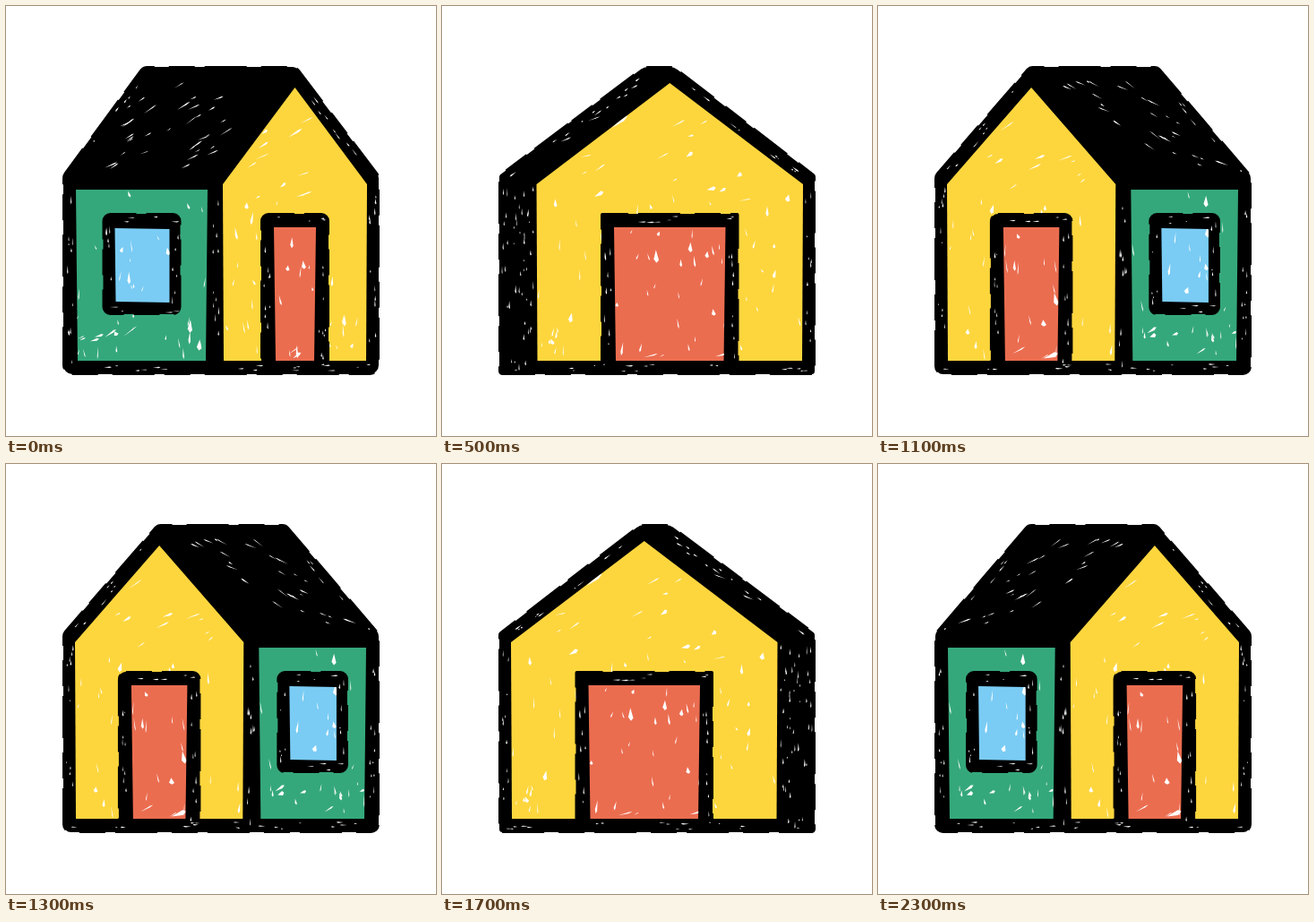
Write an HTML page with a canvas that moves like this. It is 480 by 480 pixels and loops after 2.4 s.

```html
<!DOCTYPE html>
<html lang="en">
<head>
<meta charset="utf-8">
<title>Turning house</title>
<style>
html, body { margin: 0; width: 100%; height: 100%; overflow: hidden; background: #fff; }
canvas { display: block; width: 100vmin; height: 100vmin; }
</style>
</head>
<body>
<canvas width="480" height="480"></canvas>
<script>
const ctx = document.querySelector('canvas').getContext('2d');
const YELLOW = '#fdd63e', GREEN = '#35a87b', RED = '#eb6d50', BLUE = '#7accf4';
const LEFT = 64, RIGHT = 416, TOP = 68, EAVE = 189, FOOT = 411, FLOOR = 396;

// Pose p runs from the widest side view (0) to the plain front (6).
function pose(p) {
  const front = [242 - 27.3 * p, 403];
  const mid = (front[0] + front[1]) / 2, half = 23.5 + 7.75 * p;
  const side = [78, front[0] - 17];
  const paneMid = (side[0] + side[1]) / 2, paneHalf = Math.max(7, 44 * Math.cos(0.44 * p));
  return {
    p, front, mid, side,
    ridge: [153 + 14.5 * p, 324 - 13 * p],
    door: [mid - half, mid + half],
    pane: [paneMid - paneHalf, paneMid + paneHalf],
    corner: 10 - 1.3 * p,
    frontal: p > 4
  };
}

let seed = 1;
function random() {
  seed = (seed * 16807) % 2147483647;
  return seed / 2147483647;
}
const range = (a, b) => a + (b - a) * random();
const mix = (a, b, t) => a + (b - a) * t;

function polygon(points, radius = 0) {
  const [ax, ay] = points[points.length - 1], [bx, by] = points[0];
  ctx.beginPath();
  ctx.moveTo((ax + bx) / 2, (ay + by) / 2);
  points.forEach(([x, y, r = radius], i) => {
    const [nx, ny] = points[(i + 1) % points.length];
    ctx.arcTo(x, y, nx, ny, r);
  });
  ctx.closePath();
}

// Fills the current path in black with a slightly uneven edge.
function ink() {
  ctx.fillStyle = ctx.strokeStyle = '#000';
  ctx.fill();
  ctx.lineWidth = 2;
  ctx.setLineDash([29, 11, 47, 16]);
  ctx.stroke();
}

function box(x, y, w, h, r) {
  ctx.beginPath();
  ctx.roundRect(x, y, w, h, r);
  ink();
}

// A thin white wedge the crayon has missed.
function speck(x, y, dx, dy, w) {
  const n = w / Math.hypot(dx, dy) / 2;
  ctx.fillStyle = '#fff';
  ctx.beginPath();
  ctx.moveTo(x, y);
  ctx.lineTo(x + dx * 0.7 - dy * n, y + dy * 0.7 + dx * n);
  ctx.lineTo(x + dx, y + dy);
  ctx.lineTo(x + dx * 0.8 + dy * n, y + dy * 0.8 - dx * n);
  ctx.fill();
}

// Small white scratches running along a black stroke.
function scratch(x1, y1, x2, y2, spread) {
  const len = Math.hypot(x2 - x1, y2 - y1), ux = (x2 - x1) / len, uy = (y2 - y1) / len;
  for (let i = 0; i < len * spread / 75; i++) {
    const t = random() * len, s = range(-spread, spread), l = range(2, 10);
    speck(x1 + ux * t - uy * s, y1 + uy * t + ux * s, ux * l, uy * l, range(0.7, 1.6));
  }
}

// Colours a shape and leaves bare flecks inside it.
function area(points, color, flecks) {
  ctx.save();
  polygon(points);
  ctx.fillStyle = color;
  ctx.fill();
  ctx.clip();
  flecks();
  ctx.restore();
}

// Mostly hairlines, now and then a broad patch.
const thickness = () => 1 + 5 * random() ** 4;

function upright(x, y, w, h, count) {
  for (let i = 0; i < count; i++) {
    speck(x + random() * w, y + random() * h, range(-3, 3), range(4, 15), thickness());
  }
}

function slanted(x, y, w, h, count) {
  for (let i = 0; i < count; i++) {
    const l = range(5, 18);
    speck(x + random() * w, y + random() * h, l, -l * range(0.2, 0.8), thickness());
  }
}

function shell({ ridge: [tl, tr], front: [fl], mid, corner, frontal }) {
  const top = frontal ? 14 : corner;
  polygon([
    [tl, TOP, top], [tr, TOP, top],
    [RIGHT, EAVE], [RIGHT, FOOT], [LEFT, FOOT], [LEFT, EAVE]
  ], corner);
  ink();

  for (let i = 0; i < (fl - 80) / 5; i++) {
    const u = range(0.05, 0.9), v = range(0.08, 0.95), l = range(4, 15);
    const x = mix(mix(tl, LEFT + 6, v), mix(mid, fl, v) - 18, u);
    speck(x, mix(76, 192, v), l, -l * range(0.35, 0.8), range(0.7, 1.6));
  }
  const wall = frontal ? (LEFT + fl) / 2 : LEFT + 7;
  scratch(wall, 200, wall, 400, wall - LEFT - 3);
  scratch(RIGHT - 7, 200, RIGHT - 7, 400, 4);
  scratch(LEFT + 8, 404, RIGHT - 8, 404, 4);
  scratch(tr + 4, 82, RIGHT - 10, EAVE + 2, 4);
  scratch(tl, 80, LEFT + 8, EAVE + 2, 3);
  if (!frontal) scratch(fl - 8, 205, fl - 8, FLOOR, 4);
}

function window_(x, w) {
  box(x + 1, 232, w - 2, 112, Math.min(w / 2 - 1, 8));
  scratch(x + 7, 240, x + 7, 336, 4);
  if (w < 40) return;
  scratch(x + w - 7, 240, x + w - 7, 336, 4);
  scratch(x + 8, 239, x + w - 8, 239, 4);
  scratch(x + 8, 338, x + w - 8, 338, 4);
  const l = x + 14, r = x + w - 13;
  area([[l, 248], [r, 249], [r, 331], [l + 1, 330]], BLUE, () => upright(l, 247, r - l, 75, w / 9));
}

function draw(step) {
  const m = step % 12, flip = step > 6 && step < 18;
  const house = pose(m > 6 ? 12 - m : m);
  const place = ([l, r]) => [flip ? 480 - r : l, r - l];
  seed = 7919 * (house.p + 3);

  ctx.fillStyle = '#fff';
  ctx.fillRect(0, 0, 480, 480);
  if (flip) ctx.setTransform(-1, 0, 0, 1, 480, 0);
  shell(house);
  ctx.resetTransform();

  if (!house.frontal) {
    const [x, w] = place(house.side);
    area([[x, 205], [x + w, 205], [x + w - 2, FLOOR], [x + 2, FLOOR]], GREEN, () => {
      upright(x, 205, w, 140, w / 10);
      upright(x, 345, w, 40, w / 10);
      slanted(x, 365, w, 25, w / 25);
    });
    window_(...place(house.pane));
  }

  const [x, w] = place(house.front);
  const peak = house.frontal ? 86 : 91;
  area([[x + w / 2, peak], [x + w, 199], [x + w - 1, FLOOR], [x + 1, FLOOR], [x, 199]], YELLOW, () => {
    slanted(x + w * 0.15, 130, w * 0.7, 90, w / 16);
    upright(x, 210, w, 170, w / 8);
    upright(x, 345, w, 40, w / 20);
  });

  const [dx, dw] = place(house.door);
  const round = house.corner > 8 ? 8 : 1;
  box(dx - 14, 232, dw + 28, FLOOR - 230, [round, round, 0, 0]);
  scratch(dx - 7, 245, dx - 7, FLOOR, 4);
  scratch(dx + dw + 7, 245, dx + dw + 7, FLOOR, 4);
  scratch(dx - 8, 239, dx + dw + 8, 239, 4);
  area([[dx, 247], [dx + dw, 247], [dx + dw - 2, FLOOR], [dx + 2, FLOOR]], RED, () => {
    upright(dx, 248, dw, 45, dw / 10);
    upright(dx, 300, dw, 85, dw / 11);
    slanted(dx, 388, dw, 6, dw / 25);
  });
}

let shown = -1;
function tick() {
  const step = Math.floor(performance.now() / 100) % 24;
  if (step !== shown) draw(shown = step);
  requestAnimationFrame(tick);
}
tick();
</script>
</body>
</html>
```
